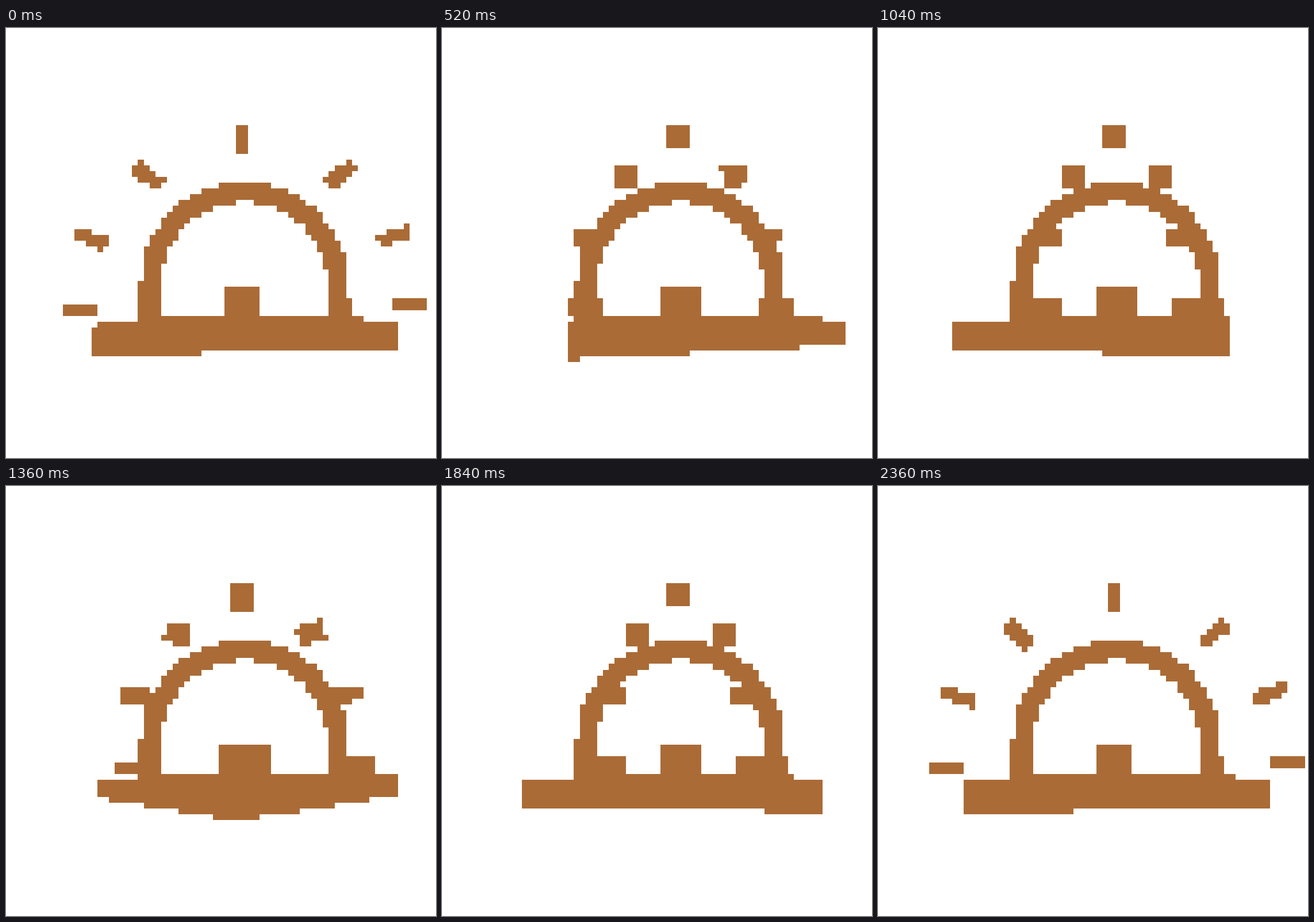
Animation of 748 by 748 pixels, one loop 2400 ms. Source, as an HTML page:

```html
<!DOCTYPE html>
<html lang="en">
<head>
<meta charset="utf-8">
<title>Turning sun</title>
<style>
  html, body { margin: 0; width: 100%; height: 100%; overflow: hidden; background: #fff; }
  svg { display: block; width: 748px; height: 748px; }
</style>
</head>
<body>
<svg viewBox="0 0 748 748" shape-rendering="crispEdges"><path id="ink" fill="#aa6b36"/></svg>
<script>
const ink = document.getElementById('ink');
const SIZE = 75, CELL = 10.06, STEPS = 60, STEP_MS = 40;
const RAD = Math.PI / 180;
const px = c => Math.floor(c * CELL - 1.41);
const py = r => Math.floor(r * CELL - 1.88);
const lerp = (a, b, k) => a + (b - a) * k;

// Arch rows: repeat count, then pairs of start and end columns
const ARCH = [
  [1, 37, 46], [1, 34, 49], [1, 32, 51], [1, 30, 40, 43, 52],
  [1, 29, 36, 47, 54], [1, 28, 34, 49, 55], [1, 27, 32, 50, 55],
  [1, 27, 31, 52, 56], [1, 26, 30, 52, 57], [1, 25, 30, 53, 57],
  [1, 25, 29, 54, 58], [1, 24, 28, 54, 58], [2, 24, 28, 55, 59],
  [1, 24, 27, 55, 59], [2, 24, 27, 56, 59], [3, 23, 27, 56, 59],
  [3, 23, 27, 56, 60], [1, 23, 61]
];

// Ray pairs: axis x, radius, y, tilt, long and short side edge-on, width and height face-on, lean
const RAYS = [
  { x: 41.4, r: 17, y: 25.8, tilt: 42, long: 6, thin: 2.6, w: 4, h: 4, lean: .1 },
  { x: 41.1, r: 27, y: 36.4, tilt: 21, long: 6, thin: 2.3, w: 5, h: 3, lean: .3 },
  { x: 41.5, r: 29.5, y: 48.6, tilt: 0, long: 6, thin: 2, w: 5.3, h: 3, lean: .5 }
];

let grid;

function span(row, from, to) {
  for (let c = from; c < to; c++) grid[row * SIZE + c] = 1;
}

// Fills the cells whose centre lies in a convex polygon
function fill(points) {
  const ys = points.map(p => p[1]);
  const end = Math.min(SIZE, Math.ceil(Math.max(...ys)));
  for (let row = Math.max(0, Math.floor(Math.min(...ys))); row < end; row++) {
    const y = row + .5;
    let lo = Infinity, hi = -Infinity;
    points.forEach((a, i) => {
      const b = points[(i + 1) % points.length];
      if ((a[1] <= y) === (b[1] <= y)) return;
      const x = a[0] + (b[0] - a[0]) * (y - a[1]) / (b[1] - a[1]);
      lo = Math.min(lo, x);
      hi = Math.max(hi, x);
    });
    if (lo < hi) span(row, Math.max(0, Math.ceil(lo - .5)), Math.min(SIZE, Math.ceil(hi - .5)));
  }
}

function hull(points) {
  const sorted = points.slice().sort((a, b) => a[0] - b[0] || a[1] - b[1]);
  const half = list => {
    const out = [];
    for (const p of list) {
      while (out.length > 1) {
        const [a, b] = out.slice(-2);
        if ((b[0] - a[0]) * (p[1] - a[1]) - (b[1] - a[1]) * (p[0] - a[0]) > 0) break;
        out.pop();
      }
      out.push(p);
    }
    out.pop();
    return out;
  };
  return half(sorted).concat(half(sorted.slice().reverse()));
}

function bar(x, y, w, h, angle) {
  const c = Math.cos(angle), s = Math.sin(angle);
  fill([[-1, -1], [1, -1], [1, 1], [-1, 1]].map(([i, j]) => {
    const u = i * w / 2, v = j * h / 2;
    return [x + u * c - v * s, y + u * s + v * c];
  }));
}

function arch() {
  let row = 27;
  for (const [count, ...cols] of ARCH)
    for (let i = 0; i < count; i++, row++)
      for (let k = 0; k < cols.length; k += 2) span(row, cols[k], cols[k + 1]);
}

function rays(turn) {
  const c = Math.abs(Math.cos(turn)), s = Math.abs(Math.sin(turn));
  const edge = c ** 3, face = 1 - edge;
  const reach = c * (1 - .06 * s);
  bar(41, 19.3, lerp(2, 4.3, face), lerp(5, 4.1, face), 0);
  for (const ray of RAYS)
    for (const side of [-1, 1])
      bar(ray.x + side * ray.r * reach, ray.y - side * ray.lean * c,
        lerp(ray.long, ray.w, face), lerp(ray.thin, ray.h, face), -side * ray.tilt * RAD * edge);
}

// Square slab in perspective, leaning slightly left, with the small block on it
function base(turn) {
  const points = [];
  for (let i = 0; i < 4; i++) {
    const a = turn + (i * 90 - 45) * RAD;
    const zoom = 60 / (60 - 26 * Math.cos(a));
    const dx = 26 * Math.sin(a) * zoom;
    const x = 41.45 + dx, lean = -.012 * dx;
    points.push([x, 49.17 + 1.43 * zoom + lean], [x, 48.54 + 5.46 * zoom + lean]);
  }
  fill(hull(points));
  const half = 3 * (Math.abs(Math.cos(turn)) + Math.abs(Math.sin(turn)));
  bar(41.4, 48, half * 2, 6, 0);
}

// Cubic easing with flat ends and control points at x = .655 and .78
function ease(t) {
  let lo = 0, hi = 1;
  for (let i = 0; i < 30; i++) {
    const u = (lo + hi) / 2, v = 1 - u;
    if (3 * v * v * u * .655 + 3 * v * u * u * .78 + u * u * u < t) lo = u;
    else hi = u;
  }
  return lo * lo * (3 - 2 * lo);
}

function outline() {
  let d = '';
  for (let row = 0; row < SIZE; row++)
    for (let c = 0; c < SIZE; c++) {
      if (!grid[row * SIZE + c]) continue;
      const from = c;
      while (c < SIZE && grid[row * SIZE + c]) c++;
      d += `M${px(from)} ${py(row)}H${px(c)}V${py(row + 1)}H${px(from)}z`;
    }
  return d;
}

let shown = -1;
function draw(ms) {
  const step = Math.floor(ms / STEP_MS) % STEPS;
  if (step === shown) return;
  shown = step;
  const t = (step + 1) / STEPS;
  grid = new Uint8Array(SIZE * SIZE);
  arch();
  rays(540 * t * RAD);
  base(360 * ease(t) * RAD);
  ink.setAttribute('d', outline());
}

const start = performance.now();
function loop() {
  draw(performance.now() - start);
  requestAnimationFrame(loop);
}
loop();
</script>
</body>
</html>
```
